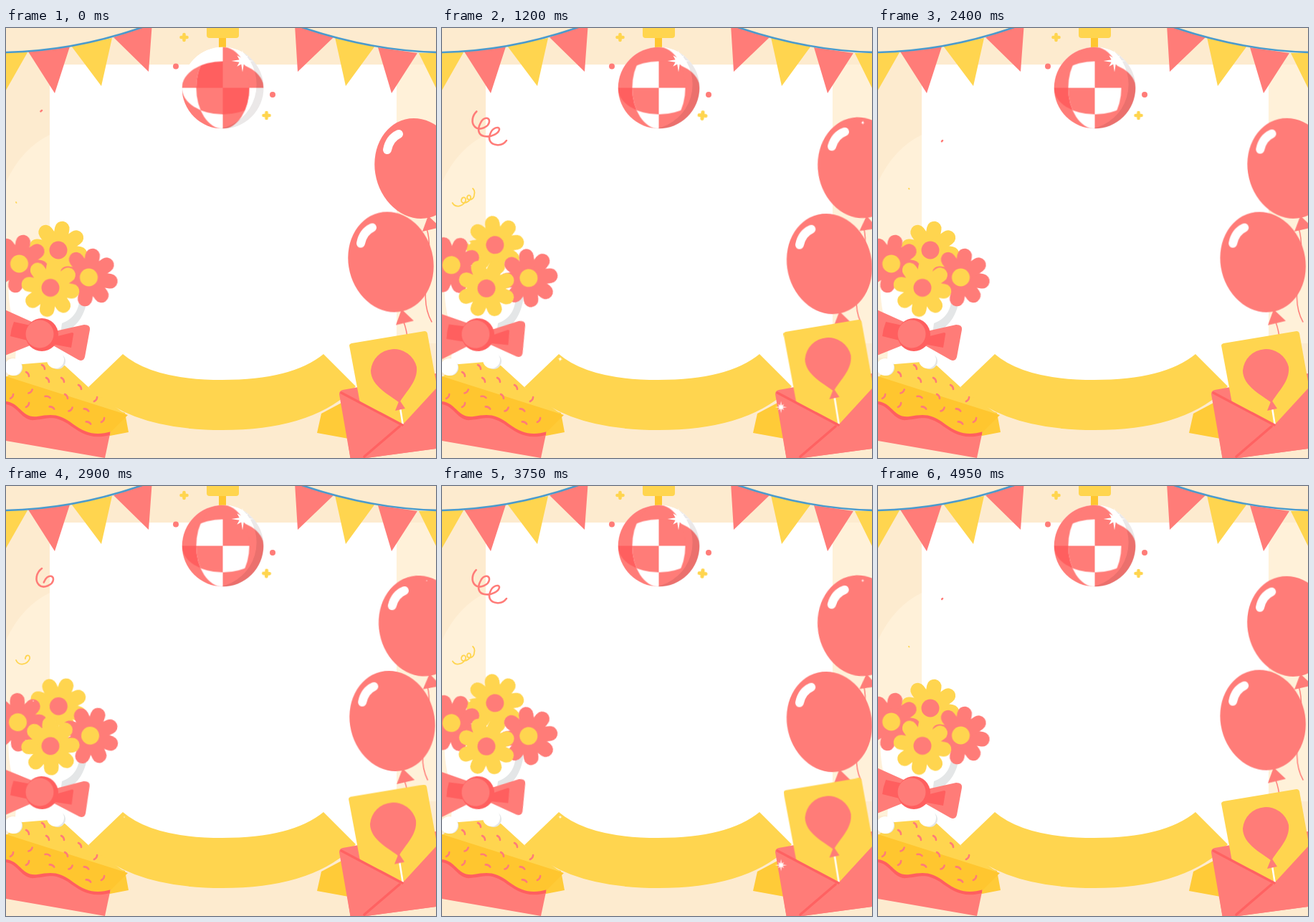
An HTML page without scripts for the animation above (5050 ms loop, 600 by 600 pixels).

```html
<!DOCTYPE html>
<html lang="en">
<head>
<meta charset="utf-8">
<title>Party frame</title>
<style>
html, body { margin: 0; width: 100%; height: 100%; overflow: hidden; background: #fdebcf; }
svg { display: block; width: 100vw; height: 100vh; }
.p { fill: #ff7c78; } .d { fill: #ff5f5f; } .y { fill: #ffd54f; } .o { fill: #ffc62f; } .w { fill: #fff; }
.line { fill: none; stroke-linecap: round; stroke-linejoin: round; }

/* every part shares one cycle; the whole loop is two of them */
.move, .bloom, .sway, .star, .curl, .look { animation: 2.525s infinite; }

.move { animation-name: move; animation-timing-function: ease-in-out; }
@keyframes move { 0%, 76%, 100% { transform: none; } 37% { transform: var(--to); } }

.bloom { animation-name: bloom; animation-timing-function: ease-in-out; }
@keyframes bloom { 0%, 86%, 100% { transform: none; } 37% { transform: var(--to); } }

.sway { animation-name: sway; animation-timing-function: linear; }
@keyframes sway {
  0%, 100% { transform: none; }
  15% { transform: translate(calc(var(--x) * .5), calc(var(--y) * .5)) rotate(calc(var(--r) * .5)); }
  34%, 40% { transform: translate(var(--x), var(--y)) rotate(var(--r)); }
  67% { transform: translate(calc(var(--x) * .6), calc(var(--y) * .6)) rotate(calc(var(--r) * .53)); }
  95% { transform: translate(calc(var(--x) * .05), calc(var(--y) * .05)) rotate(calc(var(--r) * .1)); }
}

.star { animation-name: twinkle; animation-timing-function: ease-in-out; }
.late { animation-name: twinkle-late; }
@keyframes twinkle { 0%, 10%, 56%, 100% { transform: scale(0); } 32% { transform: scale(1); } }
@keyframes twinkle-late { 0%, 14%, 88%, 100% { transform: scale(0); } 32%, 50% { transform: scale(1); } 67% { transform: scale(.85); } }

.curl { animation-name: draw; animation-timing-function: linear; }
@keyframes draw {
  0% { stroke-dasharray: 1 300; stroke-dashoffset: 0; }
  31.6% { stroke-dasharray: 87 300; stroke-dashoffset: 0; }
  45% { stroke-dasharray: 100 300; stroke-dashoffset: 0; }
  67% { stroke-dasharray: 89 300; stroke-dashoffset: -11; }
  94.7% { stroke-dasharray: 1 300; stroke-dashoffset: -99; }
  100% { stroke-dasharray: 0 300; stroke-dashoffset: -100; }
}

/* the three looks of the mirror ball switch hard */
.look { animation-timing-function: step-end; }
.a { animation-name: look-a; } .b { animation-name: look-b; } .c { animation-name: look-c; }
@keyframes look-a { 0%, 33%, 66%, 100% { opacity: 1; } 11%, 44%, 77% { opacity: 0; } }
@keyframes look-b { 0%, 33%, 66%, 88%, 100% { opacity: 0; } 22%, 55%, 77% { opacity: 1; } }
@keyframes look-c { 0%, 22%, 55%, 100% { opacity: 0; } 11%, 44%, 88% { opacity: 1; } }
</style>
</head>
<body>
<svg viewBox="0 0 600 600">
<defs>
  <clipPath id="ball"><circle r="57"/></clipPath>
  <clipPath id="wide"><ellipse rx="57" ry="37"/></clipPath>
  <clipPath id="tall"><ellipse rx="37" ry="57"/></clipPath>
  <path id="tl" d="M0 0h-58v-58h58z"/>
  <path id="tr" d="M0 0h58v-58h-58z"/>
  <path id="bl" d="M0 0h-58v58h58z"/>
  <path id="br" d="M0 0h58v58h-58z"/>
  <g id="petals">
    <path id="cross" class="line" stroke-width="20.5" d="M-30.500 0H30.500M0-30.500V30.500"/>
    <use href="#cross" transform="rotate(45)"/>
  </g>
  <path id="spark" fill="#fff" d="M0-14L1.6-4 7-7 4-1.6 14 0 4 1.6 7 7 1.6 4 0 14-1.6 4-7 7-4 1.6-14 0-4-1.6-7-7-1.6-4z"/>
  <path id="plus" class="line" stroke="#ffd54f" stroke-width="4.6" d="M-4 0H4M0-4V4"/>
  <g id="balloon">
    <path class="p" d="M15 66L7 88 32 82z"/>
    <ellipse class="p" rx="59" ry="70.5" transform="rotate(-14)"/>
    <path class="line" stroke="#fff" stroke-width="12" d="M-42-26Q-39-42-26-48"/>
  </g>
  <path id="sprinkle" class="line" stroke="#ff7c78" stroke-width="2.6" d="M-2-3Q2-1 2 3"/>
</defs>

<!-- backdrop -->
<rect width="600" height="600" fill="#fdebcf"/>
<path fill="#fff1d9" d="M0 215Q22 168 61 149V460H0zM545 51H600V440H545z"/>
<rect class="w" x="61" y="51" width="484" height="450"/>

<!-- bunting -->
<path class="p" d="M31 33L89 26 68 91zM150 13L204-8 199 61zM403-4L457 13 407 61zM519 27L574 35 538 91z"/>
<path class="y" d="M-28 34L30 34-3 92zM91 25L148 14 133 81zM459 13L515 25 474 81zM576 35L634 34 604 92z"/>
<path class="line" stroke="#4b9bcd" stroke-width="2.6" d="M-5 34Q92 33 190-1M413-1Q510 32 605 34"/>

<!-- ribbon -->
<path fill="#ffcb38" d="M140 528L166 537 171 564 140 570zM440 538L470 522 478 573 434 565z"/>
<path class="y" d="M115 501L163 455Q205 491 302 491T443 455L488 500Q430 561 302 561T115 501z"/>

<!-- cake -->
<path class="p" d="M0 515L146 562 138 600 0 576z"/>
<path class="y" d="M0 488L22 466 60 463 82 471 116 502 168 540 90 535z"/>
<path class="d" d="M0 515V525C18 528 22 549 40 547C60 545 66 540 86 552C104 565 118 575 145 568V555z"/>
<path class="o" d="M0 486L170 540 147 563C126 569 112 566 94 553C74 537 62 539 44 542C22 545 20 523 0 521z"/>
<g>
  <use href="#sprinkle" x="30" y="483"/>
  <use href="#sprinkle" x="52" y="473"/>
  <use href="#sprinkle" x="58" y="491"/>
  <use href="#sprinkle" x="79" y="491"/>
  <use href="#sprinkle" x="103" y="501"/>
  <use href="#sprinkle" x="84" y="514"/>
  <use href="#sprinkle" transform="translate(8 514)rotate(70)"/>
  <use href="#sprinkle" transform="translate(34 507)rotate(80)"/>
  <use href="#sprinkle" transform="translate(30 526)rotate(70)"/>
  <use href="#sprinkle" transform="translate(58 515)rotate(-40)"/>
  <use href="#sprinkle" transform="translate(64 530)rotate(-30)"/>
  <use href="#sprinkle" transform="translate(90 532)rotate(80)"/>
  <use href="#sprinkle" transform="translate(125 518)rotate(70)"/>
  <use href="#sprinkle" transform="translate(112 533)rotate(-30)"/>
  <use href="#sprinkle" transform="translate(115 551)rotate(-30)"/>
  <use href="#sprinkle" transform="translate(135 547)rotate(70)"/>
</g>

<!-- vase -->
<path class="w" d="M4 350C0 400 20 420 12 470L72 465C80 430 115 410 116 350z"/>
<path fill="#e4e6e7" d="M114 372C112 402 96 421 76 427L78 412C94 406 103 394 103 372z"/>
<circle cx="12" cy="474" r="11" fill="#e4e6e7"/><circle class="w" cx="10" cy="473" r="12"/>
<circle cx="72" cy="465" r="11" fill="#e4e6e7"/><circle class="w" cx="69" cy="463" r="12"/>

<!-- flowers -->
<g transform="translate(73 310)"><g class="bloom" style="--to:translate(1px,-8px) rotate(31deg)">
  <use href="#petals" stroke="#ffd54f" transform="rotate(10)"/><circle class="p" r="12.5"/>
</g></g>
<g transform="translate(18.500 329)"><g class="bloom" style="--to:translate(-6px,2px) rotate(-34deg)">
  <use href="#petals" stroke="#ff7c78" transform="rotate(10)"/><circle class="y" r="12.5"/>
</g></g>
<g transform="translate(115.500 348)"><g class="bloom" style="--to:translate(6px,1px) rotate(32deg)">
  <use href="#petals" stroke="#ff7c78" transform="rotate(10)"/><circle class="y" r="12.5"/>
</g></g>
<g transform="translate(62 362.500)"><g class="bloom" style="--to:translate(0px,1px) rotate(-34deg)">
  <use href="#petals" stroke="#ffd54f" transform="rotate(9)"/><circle class="p" r="12.5"/>
</g></g>

<!-- bow -->
<g transform="translate(50 428)"><g class="move" style="--to:rotate(-6deg)">
  <path class="p" d="M14-4L59-14Q68-14 67-7L60 31Q58 38 51 35L14 14zM-14-18L-54-36V30L-14 14z"/>
  <path class="d" d="M14 4L42-3Q45-3 44 0L41 18 14 13zM-16-13L-39-18Q-43-8-44 2L-20 8z"/>
  <circle class="d" r="23"/><circle class="p" cx="-3" cy="-1" r="19.500"/>
</g></g>

<!-- mirror ball -->
<rect class="y" x="280" y="-8" width="45" height="22" rx="4"/>
<path class="o" d="M297 14h10v13h-10z"/>
<g transform="translate(302.500 83.500)">
  <g clip-path="url(#ball)">
    <circle class="w" r="57"/>
    <g class="look a">
      <circle class="w" r="57"/>
      <use href="#bl" class="p"/>
      <g clip-path="url(#wide)"><use href="#tl" class="p"/><use href="#tr" class="p"/><use href="#bl" class="w"/><use href="#br" class="w"/></g>
      <g clip-path="url(#tall)">
        <use href="#tl" class="w"/><use href="#tr" class="p"/><use href="#bl" class="w"/><use href="#br" class="p"/>
        <g clip-path="url(#wide)"><use href="#tl" class="d"/><use href="#tr" class="p"/><use href="#bl" class="p"/><use href="#br" class="d"/></g>
      </g>
    </g>
    <g class="look b">
      <circle class="w" r="57"/>
      <use href="#tl" class="p"/><use href="#tr" class="p"/>
      <g clip-path="url(#wide)"><use href="#tl" class="w"/><use href="#tr" class="p"/><use href="#bl" class="p"/><use href="#br" class="d"/></g>
      <g clip-path="url(#tall)">
        <use href="#tl" class="w"/><use href="#tr" class="p"/><use href="#bl" class="p"/><use href="#br" class="d"/>
        <g clip-path="url(#wide)"><use href="#tl" class="p"/><use href="#tr" class="d"/><use href="#bl" class="w"/><use href="#br" class="p"/></g>
      </g>
    </g>
    <g class="look c">
      <circle class="p" r="57"/>
      <use href="#tr" class="w"/>
      <g clip-path="url(#wide)"><use href="#tl" class="p"/><use href="#tr" class="p"/><use href="#bl" class="d"/><use href="#br" class="p"/></g>
      <g clip-path="url(#tall)">
        <use href="#tl" class="p"/><use href="#tr" class="p"/><use href="#bl" class="w"/><use href="#br" class="p"/>
        <g clip-path="url(#wide)"><use href="#tl" class="w"/><use href="#tr" class="p"/><use href="#bl" class="p"/><use href="#br" class="w"/></g>
      </g>
    </g>
    <path fill="#200" opacity=".09" d="M28-50A57 57 0 0 1-4 57A63 63 0 0 0 28-50z"/>
  </g>
  <use href="#spark" transform="translate(27.500 -37.500)scale(1.1)"/>
</g>
<circle class="p" cx="237" cy="53.500" r="4"/>
<circle class="p" cx="372" cy="93" r="4"/>
<use href="#plus" x="248.500" y="13"/>
<g transform="translate(363.500 122)"><g class="move" style="--to:rotate(8deg) scale(1.12)"><use href="#plus"/></g></g>

<!-- balloons -->
<g transform="translate(590 300)"><g class="sway" style="--x:0px;--y:0px;--r:6deg">
  <path class="line" stroke="#ff7c78" stroke-width="1.500" d="M-3-20C10 20-18 72 4 110"/>
  <use href="#balloon" x="-16" y="-104"/>
</g></g>
<g transform="translate(537 326.500)"><g class="sway" style="--x:4px;--y:3px;--r:1deg">
  <path class="line" stroke="#ff7c78" stroke-width="1.500" d="M18 84Q22 94 24 112"/>
  <use href="#balloon"/>
</g></g>

<!-- envelope -->
<path class="p" d="M470 505L600 482V587L481 603 465 511Q465 506 470 505z"/>
<g class="move" style="--to:translate(-3px,-19px)">
  <path class="y" d="M482 440L584 423Q587 423 588 426L612 560 505 582 479 443Q479 441 482 440z"/>
  <path class="line" stroke="#fff" stroke-width="2.500" d="M550 530L558 580"/>
  <path class="p" d="M549 519L543 534 557 531z"/>
  <path class="p" d="M549 523C537 513 509 500 509 478A32.500 32.500 0 0 1 573 473C575 493 558 507 549 523z"/>
</g>
<path class="p" d="M466 507L554 553 600 503V587L481 603z"/>
<path class="line" stroke="#ff6262" stroke-width="3.500" d="M468 509L553 554M500 598L549 556"/>

<!-- confetti curls -->
<path class="line curl" pathLength="100" stroke="#ff7c78" stroke-width="2.600" d="M50 115C42 121 40 132 46 138C52 144 66 138 66 130C66 124 58 124 54 132C48 143 52 150 59 151C70 153 80 146 80 141C79 137 71 139 68 146C63 156 68 162 76 163C82 164 87 161 90 157"/>
<path class="line curl" pathLength="100" stroke="#ffd54f" stroke-width="1.800" d="M14 243C18 252 30 249 33 241C34 235 28 235 27 240C26 246 36 245 40 238C41 232 35 232 35 237C36 242 45 240 45 232C46 229 45 226 43 224"/>

<!-- sparkles -->
<g transform="translate(38 300)"><use class="star" href="#spark"/></g>
<g transform="translate(165 462)rotate(12)"><use class="star" href="#spark"/></g>
<g transform="translate(587 132)scale(.9)"><use class="star" href="#spark"/></g>
<g transform="translate(473 529)scale(.6)"><use class="star late" href="#spark"/></g>
</svg>
</body>
</html>
```
